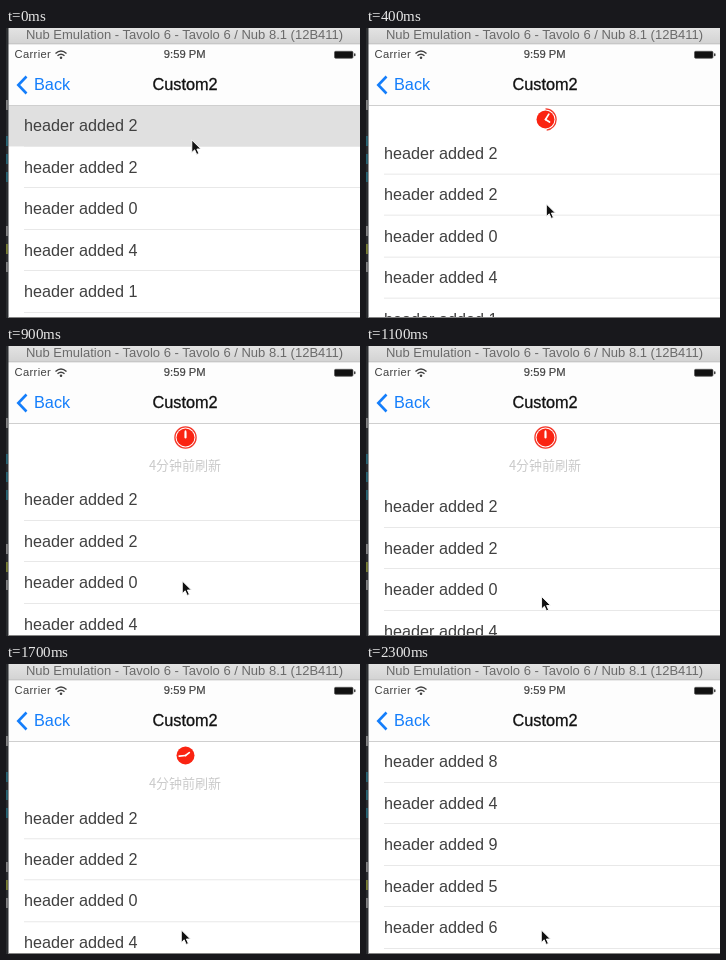
Animation of 354x290 px, one loop 2.4 s. Source, as an HTML page:

```html
<!DOCTYPE html>
<html lang="en">
<head>
<meta charset="utf-8">
<title>Pull to refresh</title>
<style>
  html, body { margin: 0; width: 100%; height: 100%; overflow: hidden; background: #fff; }
  svg { display: block; font-family: "Liberation Sans", Arial, sans-serif; }
  .row text { font-size: 16.2px; fill: #404040; }
  .note { font: 13px "Noto Sans CJK SC", "Noto Sans CJK", sans-serif; fill: #cacaca; }
  .status { font-size: 11.2px; fill: #404040; }
  .line { stroke: #e8e8e8; }
  .hand { stroke: #fff; stroke-width: 1.7; stroke-linecap: round; }
</style>
</head>
<body>
<svg id="stage" width="354" height="290" viewBox="0 0 354 290">
  <defs>
    <linearGradient id="bar" x2="0" y2="1">
      <stop stop-color="#e3e3e3"/><stop offset="1" stop-color="#d3d3d3"/>
    </linearGradient>
  </defs>
  <rect width="354" height="290" fill="#fff"/>

  <g id="header">
    <circle id="ring" cx="179.5" cy="91.5" r="10.6" fill="none" stroke="#f43a2c" stroke-width="1.3"
      pathLength="100" transform="rotate(-90 179.5 91.5)"/>
    <circle cx="179.5" cy="91.5" r="9" fill="#fa2412"/>
    <path id="long" class="hand" d="M179.5 91.5v-6.3"/>
    <path id="short" class="hand" d="M179.5 91.5v-4.8"/>
    <text class="note" x="179" y="124" text-anchor="middle">4分钟前刷新</text>
  </g>

  <g id="list"></g>

  <g id="nav">
    <rect x="3" y="15" width="351" height="62" fill="#fdfdfd"/>
    <path d="M3 77.5H354" stroke="#cfcfcf"/>
    <path d="M20.5 48.5L12.3 57l8.2 8.5" fill="none" stroke="#147efb" stroke-width="2.6"/>
    <text x="28" y="62" font-size="16.3" fill="#147efb">Back</text>
    <text x="179" y="62" font-size="16.3" fill="#111" stroke="#111" stroke-width=".3" text-anchor="middle">Custom2</text>
    <text class="status" x="8.5" y="30.3" letter-spacing=".35">Carrier</text>
    <text class="status" x="178.7" y="30.3" text-anchor="middle" stroke="#404040" stroke-width=".2">9:59 PM</text>
    <g fill="none" stroke="#404040" stroke-width="1.4">
      <path d="M49.5 25.5q5.5-4.8 11 0M51.5 27.7q3.5-3 7 0"/>
      <circle cx="55" cy="29.7" r=".6"/>
    </g>
    <rect x="328.5" y="23.3" width="18.5" height="7" rx="1.2" fill="#111" stroke="#555" stroke-width=".7"/>
    <rect x="348" y="25.3" width="1.5" height="3" rx=".7" fill="#404040"/>
    <rect x="2" width="352" height="15.5" fill="url(#bar)"/>
    <path d="M2 15.8H354" stroke="#b9b9b9"/>
    <text x="178.5" y="11" font-size="13" fill="#6a6a6a" text-anchor="middle">Nub Emulation - Tavolo 6 - Tavolo 6 / Nub 8.1 (12B411)</text>
  </g>

  <g id="edge"><rect width="2.5" height="290" fill="#2b2d30"/></g>
  <path d="M2 289.5H354" stroke="#858585"/>
  <path id="cursor" d="M0 0v12.5l2.9-2.7 2 4.6 2.2-.9-2-4.5h4z" fill="#111" stroke="#fff" stroke-width=".9"/>
</svg>
<script>
const LOOP = 2400, STEP = 100, PITCH = 41.45, TOP = 77;
const RELEASE = 1300, SPIN = 1400, CLOSE = 2100, CLOSE_TIME = 200;
const REST = 56, TURN = 173;
const OLD = [2, 2, 0, 4, 1], FRESH = [8, 4, 9, 5, 6];
const $ = id => document.getElementById(id);
const clamp = v => Math.min(1, Math.max(0, v));

// Drag key points: time, list offset, pointer height.
const DRAG = [[0, 0, 112], [200, 17, 155], [600, 38.3, 197], [900, 56, 235], [RELEASE, 70, 266]];

function drag(t, column) {
  const i = DRAG.findIndex(p => p[0] >= t);
  if (i < 0) return DRAG[DRAG.length - 1][column];
  if (i === 0) return DRAG[0][column];
  const from = DRAG[i - 1], to = DRAG[i];
  return from[column] + (to[column] - from[column]) * (t - from[0]) / (to[0] - from[0]);
}

// Follow the finger, settle at the resting height, then ease shut.
function pull(t) {
  if (t <= RELEASE) return drag(t, 1);
  if (t <= CLOSE) return REST + (drag(RELEASE, 1) - REST) * Math.exp((RELEASE - t) / 100);
  return REST * (1 + Math.cos(Math.PI * clamp((t - CLOSE) / CLOSE_TIME))) / 2;
}

function make(parent, tag, attrs) {
  const el = document.createElementNS("http://www.w3.org/2000/svg", tag);
  for (const key in attrs) el.setAttribute(key, attrs[key]);
  return parent.appendChild(el);
}

make($("list"), "rect", { x: 2.5, y: TOP, width: 352, height: 290, fill: "#fff" });
const press = make($("list"), "rect", { x: 2.5, y: TOP, width: 352, height: PITCH, fill: "#e0e0e0" });
const labels = OLD.map((_, i) => {
  const row = make($("list"), "g", { class: "row" });
  const y = TOP + i * PITCH;
  make(row, "path", { class: "line", d: `M18 ${Math.floor(y + PITCH) + .5}H354` });
  return make(row, "text", { x: 18, y: y + 26.3 });
});

// Slivers of coloured code behind the window.
const INK = { g: "#aaa", t: "#287f94", y: "#9da43a" };
[..."g.ttt..gyg"].forEach((c, i) => {
  if (INK[c]) make($("edge"), "rect", { y: 72 + 18 * i, width: 1.8, height: 10, fill: INK[c], opacity: .7 });
});

function turn(id, turns) {
  $(id).setAttribute("transform", `rotate(${turns * 360} 179.5 91.5)`);
}

function draw(time) {
  const t = Math.floor(time % LOOP / STEP) * STEP;
  const offset = pull(t);
  const values = t > CLOSE ? FRESH : OLD;
  labels.forEach((label, i) => label.textContent = "header added " + values[i]);
  $("list").setAttribute("transform", `translate(0 ${offset})`);
  press.style.display = t ? "none" : "";

  const progress = clamp((offset - 13) / (REST - 13));
  const arc = t > SPIN ? 0 : clamp(2 * progress - .2);
  $("ring").setAttribute("stroke-dasharray", `${arc * 100} 100`);
  $("ring").style.display = arc ? "" : "none";

  // The long hand makes one turn per hour of the short one.
  const hours = t > SPIN ? (t - SPIN) / TURN : progress * 12;
  turn("long", hours);
  turn("short", hours / 12);

  const x = 175.3 + 10.5 * (1 - clamp(t / RELEASE)) ** 2;
  $("cursor").setAttribute("transform", `translate(${x} ${drag(t, 2)})`);
}

const start = performance.now();
function tick() {
  draw(performance.now() - start);
  requestAnimationFrame(tick);
}
tick();
</script>
</body>
</html>
```
